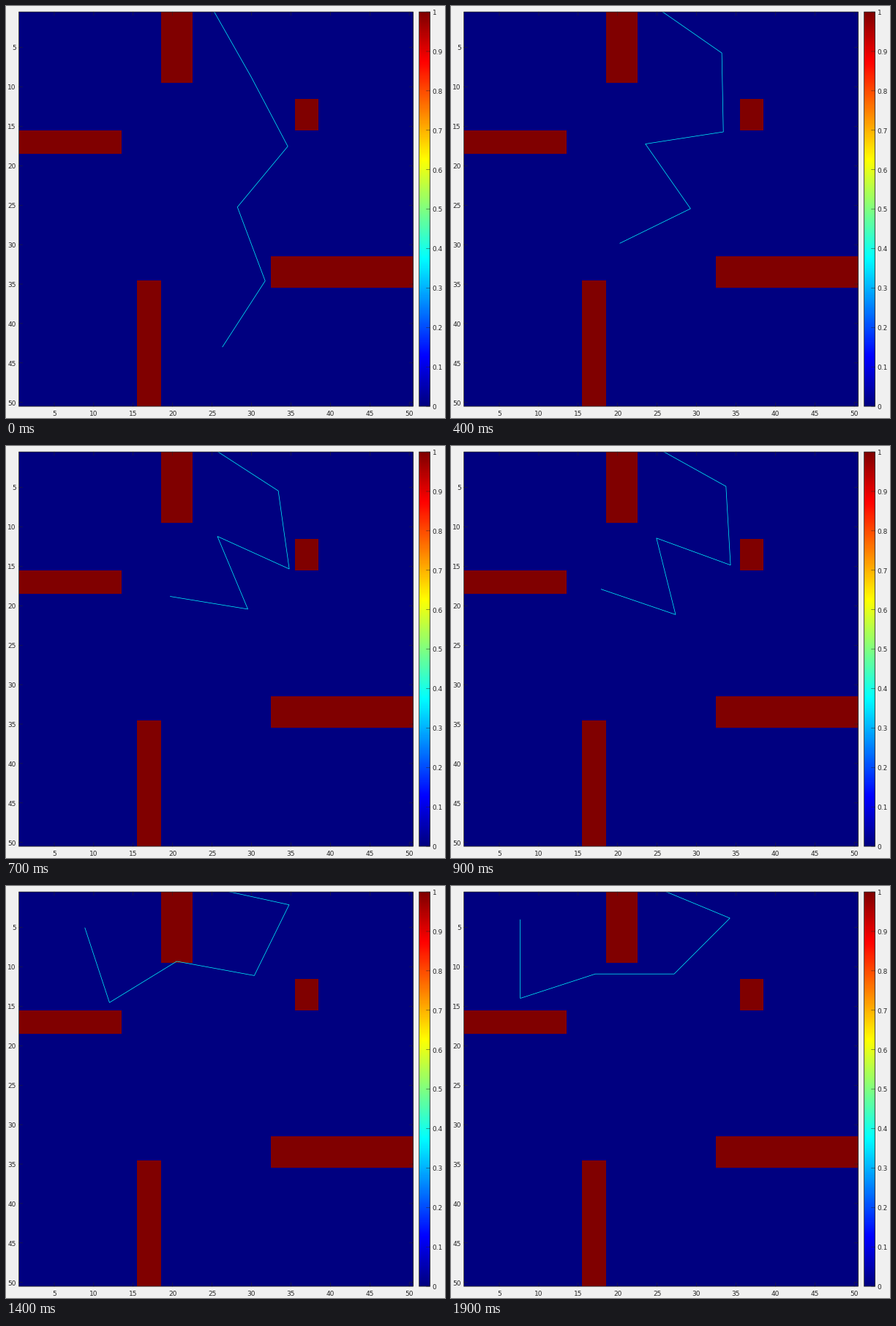
Recreate the animation shown at these times as a matplotlib script. Size 600 px wide and 563 px high, loop 3600 ms.

```python
import numpy as np
import matplotlib.pyplot as plt
from matplotlib.animation import FuncAnimation
from matplotlib.patches import Rectangle

W, H, DPI = 600, 563, 100
PX = 72 / DPI                      # one pixel in points
LEFT, TOP, UNIT = 17.0, 7.6, 10.78  # plot corner and pixels per cell
SIDE = 50 * UNIT
BAR_X, BAR_W = 564, 15
TICK = 5
INK = "#262626"

# obstacles: x, y, width, height in cells
BLOCKS = [(18, 0, 4, 9), (35, 11, 3, 4), (0, 15, 13, 3),
          (32, 31, 18, 4), (15, 34, 3, 16)]

# five equal links hang from BASE; headings in degrees
BASE, LINK = (25, 0), 10
START = (60.4, 62.2, 129.7, 69.4, 122.9)
# each move: first step, last step, headings reached
MOVES = [
    (0, 1, (53.7, 72.5, 150.6, 77.2, 130.3)),
    (1, 4, (34.8, 88.9, 171.2, 55.1, 153.9)),
    (4, 7, (32.9, 82.0, 204.4, 67.3, 189.3)),
    (7, 11, (17.7, 100.7, 186.9, 101.8, 227.4)),
    (11, 14, (12.3, 116.2, 190.4, 148.5, 251.8)),
    (15, 19, (22.5, 135, 180, 162, 270)),
]


def px(x):
    return LEFT + (x - 0.5) * UNIT


def py(y):
    return TOP + (y - 0.5) * UNIT


def jet(v):
    """Piecewise linear blue-cyan-yellow-red ramp."""
    v = np.asarray(v)[..., None]
    return np.clip(1.5 - np.abs(4 * v - np.array([3, 2, 1])), 0, 1)


def headings(step):
    """Chain the moves, each one easing in quadratically."""
    pose = np.array(START)
    for first, last, goal in MOVES:
        t = np.clip((step - first) / (last - first), 0, 1) ** 2
        pose = pose + t * (np.array(goal) - pose)
    return np.radians(pose)


fig = plt.figure(figsize=(W / DPI, H / DPI), dpi=DPI, facecolor="#f0f0f0")
ax = fig.add_axes([0, 0, 1, 1])
ax.axis("off")


def box(x, y, w, h, **style):
    return ax.add_patch(Rectangle((x, y), w, h, **style))


def fill(x, y, w, h, value):
    return box(LEFT + x * UNIT, TOP + y * UNIT, w * UNIT, h * UNIT,
               fc=jet(value), ec="none", antialiased=False)


def stroke(xs, ys):
    ax.plot(xs, ys, color=INK, lw=0.5 * PX, snap=False, zorder=4)


def label(x, y, text, ha):
    ax.text(x, y, text, ha=ha, va="center_baseline", color=INK,
            family="DejaVu Sans", size=9 * PX)


field = fill(0, 0, 50, 50, 0.0)
for block in BLOCKS:
    fill(*block, 1.0)

ramp = jet(np.linspace(1, 0, 256))[:, None, :]
ax.imshow(ramp, extent=(BAR_X, BAR_X + BAR_W, TOP + SIDE, TOP),
          aspect="auto", interpolation="nearest")

for x, w in ((LEFT, SIDE), (BAR_X, BAR_W)):
    box(x, TOP, w, SIDE, fc="none", ec=INK, lw=0.8 * PX, snap=False, zorder=4)

for n in range(5, 51, 5):
    x, y = px(n), py(n)
    for edge, d in ((0, TICK), (SIDE, -TICK)):
        stroke([x, x], [TOP + edge, TOP + edge + d])
        stroke([LEFT + edge, LEFT + edge + d], [y, y])
    label(x, 556, str(n), "center")
    label(13.3, y + 0.3, str(n), "right")

for n in range(11):
    y = TOP + SIDE * (1 - n / 10)
    stroke([BAR_X + BAR_W - TICK, BAR_X + BAR_W], [y, y])
    label(582, y + 0.3, f"{n / 10:g}", "left")

ax.set_xlim(-0.5, W - 0.5)
ax.set_ylim(H - 0.5, -0.5)

arm, = ax.plot([], [], color="#00ffff", lw=0.7 * PX, solid_joinstyle="miter",
               solid_capstyle="butt", zorder=3)
arm.set_clip_path(field)


def draw(step):
    a = headings(step)
    xs = BASE[0] + LINK * np.r_[0, np.cumsum(np.cos(a))]
    ys = BASE[1] + LINK * np.r_[0, np.cumsum(np.sin(a))]
    arm.set_data(px(xs), py(ys))
    return arm,


anim = FuncAnimation(fig, draw, frames=36, interval=100, repeat=True)
plt.show()
```
